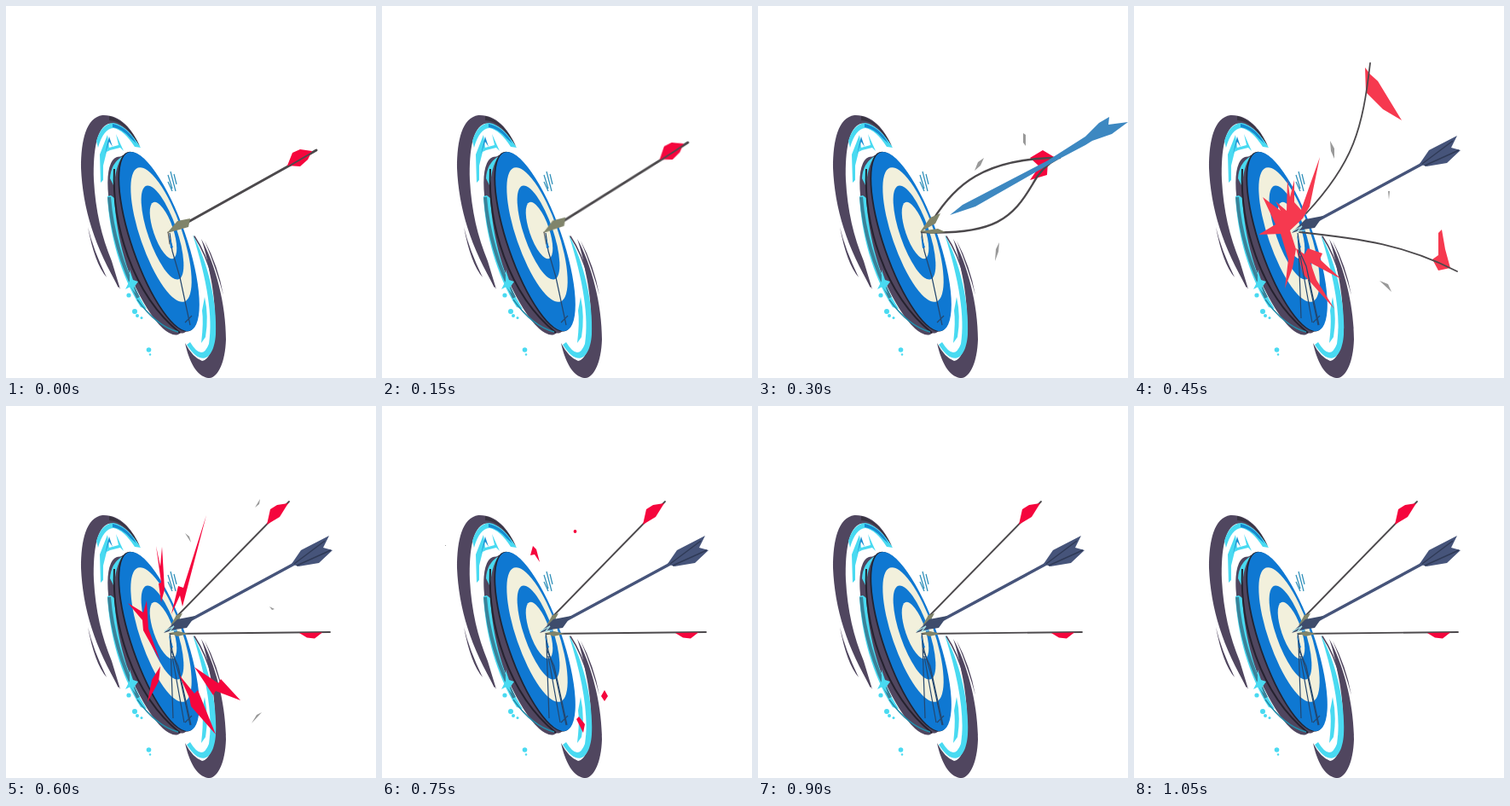
These frames come from a looping animation (434x436 px, 1.2 s). An HTML page without scripts:

```html
<!DOCTYPE html>
<html lang="en">
<head>
<meta charset="utf-8">
<title>Split arrow</title>
<style>
  html, body { margin: 0; width: 100%; height: 100%; overflow: hidden; background: #fff; }
  svg { display: block; width: 100%; height: 100%; }

  .dark { fill: #50465f; }
  .cyan { fill: #49daf1; }
  .blue { fill: #0f78d2; }
  .cream { fill: #f2f0dc; }
  .red { fill: #f5063d; }
  .hot { fill: #f6394f; }
  .olive { fill: #80846a; }
  .grey { fill: #999; }
  .line { fill: none; stroke: #4c494c; stroke-linecap: round; }
  .crack { fill: none; stroke: #24476f; stroke-width: 1.2; }

  /* --at: start, in steps of 150 ms */
  .beat, .pair, .late { visibility: hidden; animation: beat 1.2s step-end infinite; animation-delay: calc(var(--at) * 150ms - 1200ms); }
  .pair { animation-name: pair; }
  .late { animation-name: late; }
  @keyframes beat { 0% { visibility: visible } 12.5%, 100% { visibility: hidden } }
  @keyframes pair { 0% { visibility: visible } 25%, 100% { visibility: hidden } }
  @keyframes late { 0% { visibility: visible } 62.5%, 100% { visibility: hidden } }

  .shake { transform-origin: 190px 265px; animation: shake 1.2s step-end infinite; }
  @keyframes shake { 0% { transform: none } 12.5% { transform: rotate(-3deg) } 25%, 100% { transform: none } }
</style>
</head>
<body>
<svg viewBox="0 0 434 436" preserveAspectRatio="none">
  <!-- spinning ring, upper left -->
  <path class="dark" d="M157 165C148 143 133 127 113 128C94 131 88 157 88 190C90 237 104 283 134 332L124 299C112 270 105 240 103 204C102 167 107 143 120 138C136 136 147 149 157 165Z"/>
  <path d="M121 129Q143 135 157 164L148 152Q137 135 121 134Z" fill="#393441"/>
  <path class="cyan" d="M106 158Q112 138 126 137Q142 140 158 166L151 165Q138 145 126 143Q114 144 108 166Z"/>
  <path d="M125 138Q143 142 153 161L146 155Q137 144 125 142Z" fill="#168bd0"/>
  <path class="cyan" d="M119 151L110 174L111 207L114 204L114 187L118 171L122 169L134 166L138 170L129 150L132 163L121 166Z"/>
  <path d="M121 153L116 174L121 159L125 165Z" fill="#168bd0"/>
  <path class="dark" d="M96 259Q102 285 118 318Q104 302 96 259Z"/>
  <path class="line" d="M109 267Q116 298 132 329" style="stroke:#50465f;stroke-width:1.5"/>

  <!-- spinning ring, lower right -->
  <path class="dark" d="M229 273C246 303 258 350 258 391C257 419 248 437 237 436C224 434 215 418 210 395Q219 412 230 416C249 412 248 354 239 313Q235 290 229 273Z"/>
  <path class="cyan" d="M219 268C237 300 248 348 246 385C244 414 229 424 212 397L216 394Q230 417 238 396C243 365 236 321 219 268Z"/>
  <path class="cyan" d="M233 341Q238 364 234 388L229 395Q232 370 230 357Z"/>
  <path class="dark" d="M233 275Q249 305 255 339Q247 309 233 275Z"/>
  <path class="line" d="M221 270Q235 291 242 319" style="stroke:#50465f;stroke-width:1.5"/>

  <!-- disc rim and face -->
  <g class="dark">
    <ellipse rx="110" ry="31.5" transform="translate(166 281) rotate(70.9)"/>
    <ellipse rx="110" ry="31.5" transform="translate(173 279) rotate(70.9)"/>
  </g>
  <path class="cyan" d="M119 223C121 266 134 315 158 353L165 355C143 320 130 274 127 225L123 222Z"/>
  <path d="M121 224Q126 285 155 342" fill="none" stroke="#3a8299" stroke-width="4"/>
  <path class="cyan" d="M122 202Q123 184 137 176Q128 188 127 212Z"/>
  <path d="M127 191C124 254 147 337 204 383" fill="none" stroke="#25222f" stroke-width="2"/>
  <path d="M154 344Q176 375 202 382" fill="none" stroke="#238ca9" stroke-width="1.5"/>
  <g transform="translate(180 276) rotate(70.9)">
    <ellipse cx="-.3" cy="1.3" rx="111" ry="32" fill="#202432"/>
    <ellipse class="blue" rx="110.5" ry="31.5"/>
  </g>
  <ellipse class="cream" rx="83" ry="24.5" transform="translate(182 268) rotate(70.9)"/>
  <ellipse class="blue" rx="58" ry="17" transform="translate(183.5 265.5) rotate(70.9)"/>
  <ellipse class="cream" rx="35" ry="11.5" transform="translate(184.5 263) rotate(70.9)"/>
  <path class="crack" d="M192 266L195 287L204 318L216 374M210 371L218 363"/>
  <path d="M191 268L196 283L193 284Z" class="blue"/>

  <!-- flecks -->
  <g class="cyan">
    <path d="M145 309L149 321L155 323L150 330L152 337L146 329L140 332L145 322Z"/>
    <circle cx="144" cy="339" r="2.6"/><circle cx="151" cy="358" r="3"/>
    <circle cx="154" cy="363" r="2"/><circle cx="159" cy="365.500" r="1.500"/>
    <circle cx="167.500" cy="403" r="2.800"/><circle cx="169" cy="408.500" r="1.200"/>
  </g>
  <path d="M190 198L195 214M193 194L199 217M197 197L200 209M190 206L195 217" stroke="#2b8db8" stroke-width="1.2" fill="none"/>

  <!-- first arrow -->
  <g class="pair" style="--at:0"><g class="shake">
    <path class="line" d="M212 254L336 185L364 169" stroke-width="3"/>
    <path class="red" d="M330 187L336 172L345 168L359 170L354 180L345 188Z"/>
    <path class="line" d="M333 187L364 169" stroke-width="2"/>
    <path class="olive" d="M189 266L201 252L216 249L214 259L200 263Z"/>
    <path class="line" d="M190 265L192 279" stroke-width="1"/>
  </g></g>

  <!-- bulging halves with the second arrow between them -->
  <g class="beat" style="--at:2">
    <path class="red" d="M319 178L334 169L349 178L340 184L339 198L319 204L330 188Z"/>
    <path class="line" d="M205 251C230 211 264 178 354 178M192 265C278 269 299 248 322 209Q333 188 353 178" stroke-width="2.4"/>
    <path class="olive" d="M190 265L202 248L214 243L208 255ZM190 264L211 261L220 265L203 267Z"/>
    <path d="M225 245L240 233L340 181L384 153L400 137L412 130L411 139L434 136L415 150L392 158L384 163L348 182L255 235Z" fill="#3d88c1"/>
    <path class="grey" d="M254 193L258 183L265 178L261 187ZM311 149L314 151L314 164L311 160ZM278 299L279 285L283 277L282 288Z"/>
  </g>

  <!-- halves flung apart -->
  <g class="beat" style="--at:3">
    <path class="hot" d="M180 203L183 224L188 204L188 230L196 239L218 177L206 235L198 249L183 263L190 285L186 307L177 331L181 297L172 267L146 268L166 256L151 224L172 240L166 229L179 240ZM190 284L200 291L204 284L221 290L218 297L243 320L207 301L214 321L235 355L209 326L198 314Z"/>
    <path class="hot" d="M271 72L277 80L286 88L314 134L292 121L272 101ZM357 266L361 262L365 285L371 307L357 310L350 297L357 292Z"/>
    <path class="line" d="M202 243C258 183 268 144 277 67M194 265C269 273 318 280 379 311" stroke-width="1.8"/>
    <path class="grey" d="M230 158L235 167L235 179L231 170ZM298 217L300 217L299 227ZM288 322L298 326L302 335Z"/>
  </g>

  <!-- halves at rest -->
  <g class="late" style="--at:4;animation-name:rest">
    <style>@keyframes rest { 0% { visibility: visible } 50%, 100% { visibility: hidden } }</style>
    <path class="line" d="M200 247L332 112M193 267L380 265" stroke-width="1.8"/>
    <path class="red" d="M306 139L310 121L318 116L331 114L321 130ZM344 266L371 265.500L362 272.500L353 271.500Z"/>
    <path class="olive" d="M193 257L200 245L207 243L202 252ZM192 266L202 264L214 267L201 270Z"/>
  </g>

  <!-- second arrow, planted -->
  <g class="late" style="--at:3">
    <path class="crack" d="M193 275L194 310L196 366M193 285L202 305L217 374M195 293L209 371"/>
    <path d="M212 253L340 184" stroke="#46547a" stroke-width="3.6"/>
    <path d="M335 185L346 169L379 152L372 166L383 169L367 184L343 188Z" fill="#46547a"/>
    <path d="M338 185L374 158M341 187L381 169" stroke="#2f3a56" stroke-width="1.4"/>
    <path d="M185 266L201 250L222 246L212 260L198 262Z" fill="#3e4c6c"/>
    <path d="M186 264L197 258L192 264L200 263" fill="none" stroke="#a5dce2" stroke-width="1.2"/>
  </g>

  <!-- red bolts -->
  <g class="beat" style="--at:4">
    <path class="red" d="M235 128L207 235L204 222L194 244L202 211L208 213ZM176 164L181 188L183 165L186 215L182 230L179 208L182 207ZM143 231L161 242L165 228L167 261L181 299L161 263L160 251ZM181 305L179 323L166 347L171 321ZM203 315L221 337L225 333L246 385L217 352L215 342ZM221 306L249 325L252 320L275 345L246 334L243 339Z"/>
    <path class="grey" d="M210 149L215 153L217 160ZM292 119L298 109L297 115ZM309 235L315 238L312 239ZM288 372L294 362L300 359Z"/>
  </g>
  <g class="beat red" style="--at:5">
    <path d="M174 175L177 164L181 168L185 183L179 174ZM257 340L261 333L265 340L261 346ZM228 367L231 364L238 373L236 383Z"/>
    <circle cx="226.500" cy="147" r="1.900"/>
    <circle class="grey" cx="74.500" cy="163.500" r=".6"/>
  </g>
</svg>
</body>
</html>
```
